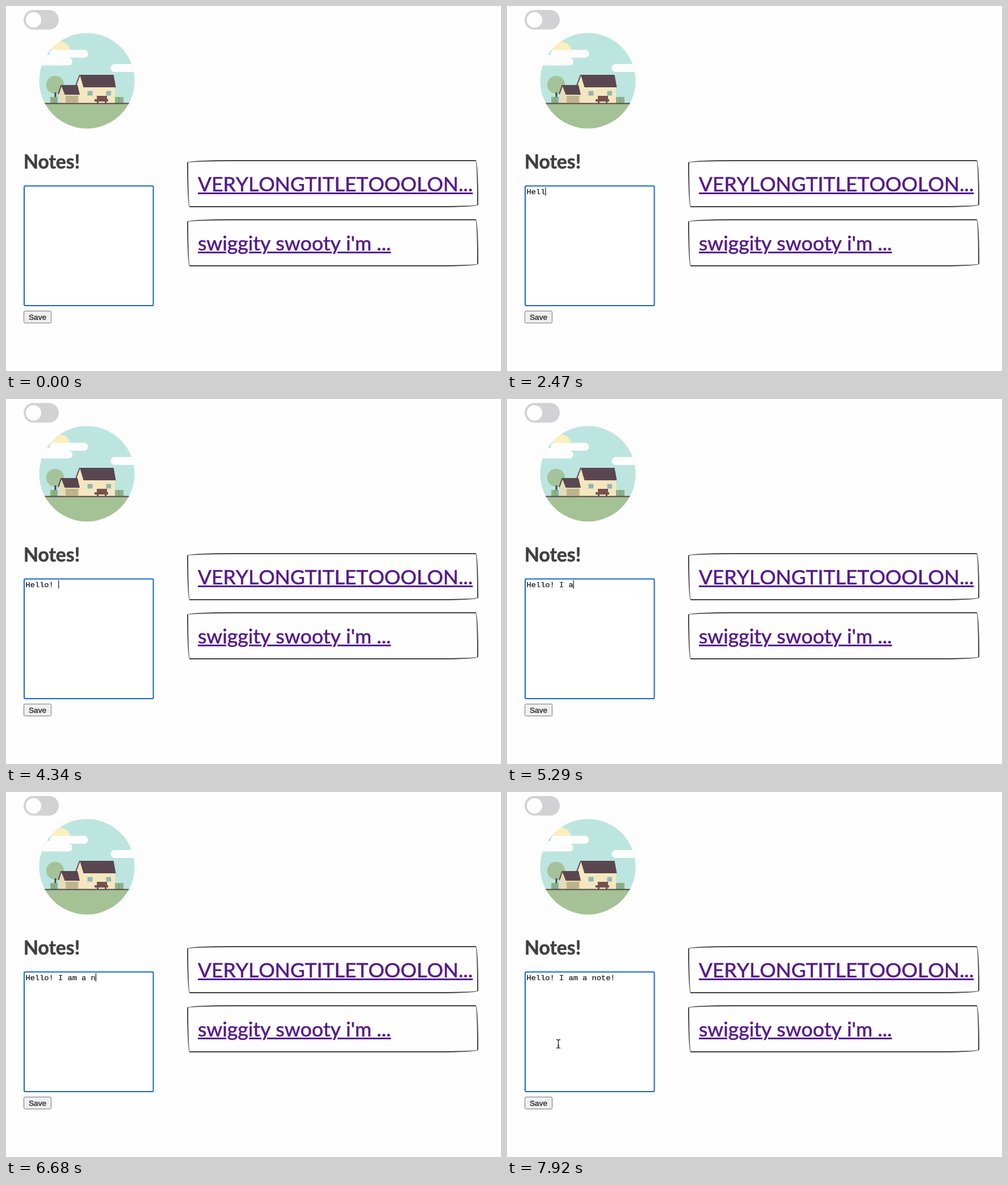
Write an HTML page that moves like this. It is 872 by 642 pixels and loops after 8 s.

```html
<!DOCTYPE html>
<html lang="en">
<head>
<meta charset="utf-8">
<title>Notes</title>
<style>
  html, body { margin: 0; width: 100%; height: 100%; overflow: hidden; background: #fefefe; }
  svg { position: absolute; left: 0; top: 0; }
  .card {
    position: absolute; left: 319px; width: 513px; height: 83px;
    box-sizing: border-box; padding-left: 17px;
    border: 2px solid #41403e;
    border-radius: 255px 15px 225px 15px / 15px 225px 15px 255px;
    font: 35.5px/80px Lato, sans-serif; font-kerning: none; white-space: nowrap;
  }
  .card span {
    color: #551a8b; -webkit-text-stroke: .6px #551a8b;
    text-decoration: underline 2.5px; text-underline-offset: 2px;
  }
  .heading { font: bold 33.7px Lato, sans-serif; fill: #404040; stroke: #404040; stroke-width: .6; }
  .button { font: 13.6px "Liberation Sans", sans-serif; fill: #222; stroke: #222; stroke-width: .35; }
  .note { font: 13.7px "Liberation Mono", monospace; fill: #111; stroke: #111; stroke-width: .2; white-space: pre; }
</style>
</head>
<body>
<div class="card" style="top:270.5px"><span>VERYLONGTITLETOOOLON...</span></div>
<div class="card" style="top:374.5px"><span>swiggity swooty i'm ...</span></div>

<svg width="872" height="642" viewBox="0 0 872 642">
  <clipPath id="disc"><circle cx="142.5" cy="131.5" r="84"/></clipPath>

  <!-- toggle -->
  <rect x="31" y="7" width="62" height="34.5" rx="17.25" fill="#d2d1d4"/>
  <circle cx="48.5" cy="24.3" r="13.6" fill="#fefefe"/>

  <!-- house picture -->
  <rect x="32" y="47" width="227" height="171" fill="#fdfdfd"/>
  <g clip-path="url(#disc)">
    <rect x="58" y="47" width="170" height="125" fill="#bde5df"/>
    <rect x="58" y="171" width="170" height="46" fill="#a4c295"/>
    <circle cx="96" cy="80" r="17" fill="#fbefbd"/>
    <g fill="#fdfdfd">
      <rect x="77" y="77" width="67.5" height="14" rx="7"/>
      <rect x="40" y="91" width="77" height="13.5" rx="6.7"/>
      <rect x="70" y="86" width="24" height="10"/>
      <rect x="184.5" y="102" width="60" height="14" rx="7"/>
    </g>
    <circle cx="86.5" cy="138.5" r="15.7" fill="#a5c399"/>
    <path d="M87 152v10" stroke="#4f4149" stroke-width="3"/>
    <path d="M78 160h13v11h-13zM192 160h15v11h-15z" fill="#8db088"/>
    <path d="M85 160v11M199 160v11" stroke="#7fa37d" stroke-width="1.5"/>
    <path d="M129 122L124 142V171H192V142L140 138Z" fill="#f4e7bf"/>
    <path d="M130 121H189.500L193.500 143H136.500Z" fill="#594650"/>
    <path d="M130 121L122.500 141" stroke="#594650" stroke-width="2"/>
    <path d="M97 140L94 156V171H129V154L104 153Z" fill="#e9dcb4"/>
    <path d="M97 139H126L130 156H103.500Z" fill="#594650"/>
    <path d="M97.500 139L92 155" stroke="#594650" stroke-width="2"/>
    <rect x="105" y="158" width="22" height="12" fill="#bdb48b"/>
    <path d="M143.500 149.500h9v8h-9zM176.500 149.500h8.500v8h-8.500z" fill="#91b6b4"/>
    <path d="M160 158h18v6h2v4h-3v3h-3v-3h-11v3h-3v-3h-4v-4h4z" fill="#76504e"/>
    <path d="M58 171.500H228" stroke="#54464a" stroke-width="2"/>
  </g>

  <text class="heading" x="31" y="285.500">Notes!</text>

  <!-- editor -->
  <rect x="32" y="316.500" width="227.500" height="210.500" rx="2" fill="#fff" stroke="#1467ca" stroke-width="2"/>
  <text class="note" id="note" x="34.500" y="331"></text>
  <path id="caret" d="M0 319V333.500" stroke="#111" stroke-width="1.2"/>
  <g id="pointer" fill="none">
    <path id="beam" d="M-3.500 -7.500Q0 -7.500 0 -5.500Q0 -7.500 3.500 -7.500M0 -5.500V5.500M-3.500 7.500Q0 7.500 0 5.500Q0 7.500 3.500 7.500M-1.500 3H1.500" stroke="#222" stroke-width="1.3"/>
  </g>

  <rect x="31.500" y="536.500" width="48" height="21" rx="2" fill="#efefef" stroke="#767676"/>
  <text class="button" x="40" y="551.500">Save</text>
</svg>

<script>
  const LOOP = 8000;
  const MESSAGE = "Hello! I am a note!";
  const KEY_TIMES = [1460, 2010, 2240, 2470, 3100, 3720, 4270, 4800, 5120, 5290,
                     5440, 5820, 6220, 6300, 6680, 6830, 6910, 6990, 7450];
  const TEXT_X = 34.5, CHAR_WIDTH = 8.22;
  const [note, caret, pointer] = ["note", "caret", "pointer"].map(id => document.getElementById(id));

  const show = (el, on) => el.setAttribute("visibility", on ? "visible" : "hidden");
  const moveTo = (el, x, y) => el.setAttribute("transform", `translate(${x} ${y})`);

  function draw() {
    const t = performance.now() % LOOP;
    const typed = KEY_TIMES.filter(time => time <= t).length;
    note.textContent = MESSAGE.slice(0, typed);

    moveTo(caret, TEXT_X + 0.6 + typed * CHAR_WIDTH, 0);
    show(caret, (t >= 70 && t < 600) || (t >= 1080 && t < 7920));

    show(pointer, t >= 7770);
    if (t < 7920) moveTo(pointer, 159.5, 403.5);
    else moveTo(pointer, 90.5, 443);

    requestAnimationFrame(draw);
  }
  draw();
</script>
</body>
</html>
```
